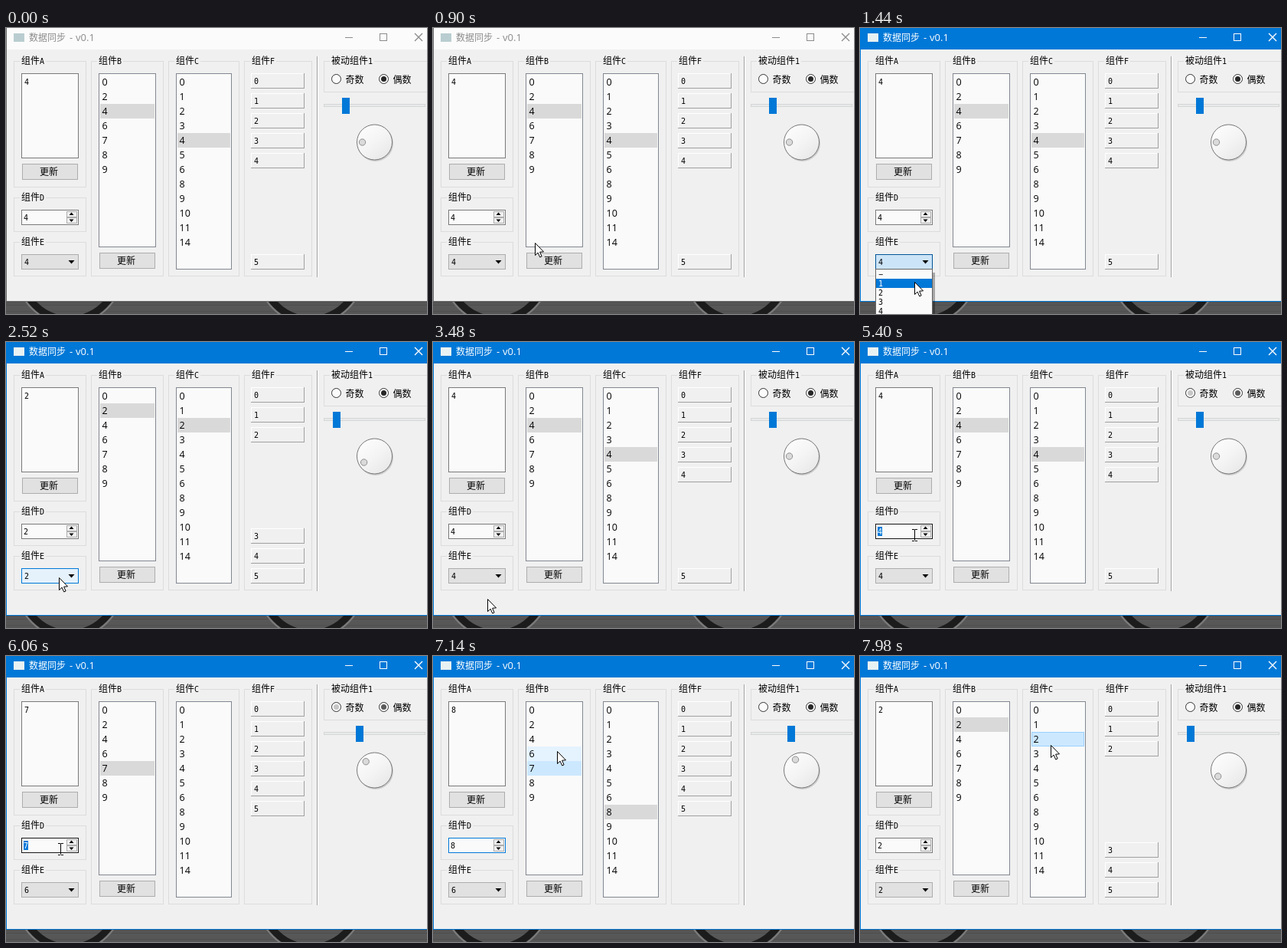
Animation of 550x373 px, one loop 8 s. Source, as an HTML page with a canvas:

```html
<!DOCTYPE html>
<html lang="zh">
<head>
<meta charset="utf-8">
<style>
html, body { margin: 0; width: 100%; height: 100%; overflow: hidden; background: #f0f0f0; }
canvas { display: block; width: 100vw; height: 100vh; }
</style>
</head>
<body>
<canvas id="stage" width="550" height="373"></canvas>
<script>
const g = document.getElementById('stage').getContext('2d');
const LOOP = 8000, STEP = 60, FADE = 240;
const BLUE = '#0078d7';
const CJK = '12px "Noto Sans CJK SC", "Noto Sans CJK", sans-serif';
const MONO = '10px "DejaVu Sans Mono", monospace';
const LIST = '12.5px "Open Sans", "Noto Sans", sans-serif';
const B_ITEMS = [0, 2, 4, 6, 7, 8, 9];
const C_ITEMS = [0, 1, 2, 3, 4, 5, 6, 8, 9, 10, 11, 14];

// [time, value]
const VALUES = [[0, 4], [1980, 2], [3360, 4], [4320, 3], [4440, 2], [4680, 1], [4740, 0],
  [5220, 1], [5280, 2], [5340, 3], [5400, 4], [5460, 5], [5520, 6], [6000, 7], [6300, 8], [7860, 2]];
// [time, x, y]
const PATH = [[300, 533, 135], [1080, 70, 303], [1200, 70, 303], [1440, 71, 331], [1800, 71, 342],
  [1980, 71, 342], [2520, 69, 307], [2880, 69, 307], [3240, 72, 366], [3360, 72, 366],
  [3600, 70, 303], [3660, 70, 303], [3900, 71, 251], [6360, 71, 251], [6720, 165, 146],
  [6840, 165, 146], [7140, 162, 124], [7560, 198, 88], [7860, 249, 116], [8000, 249, 116]];

const within = (t, a, b) => t >= a && t < b;
const inside = (p, x, y, w, h) => p && p.x >= x && p.x < x + w && p.y >= y && p.y < y + h;

function valueAt(t) {
  let v = 4;
  for (const [time, n] of VALUES) if (time <= t) v = n;
  return v;
}

// 1 = even is marked, 0 = odd
function evenLevel(t) {
  let level = 1;
  VALUES.forEach(([time, n], i) => {
    if (time > t) return;
    const end = Math.min(t, i + 1 < VALUES.length ? VALUES[i + 1][0] : LOOP);
    const move = (end - time) / FADE;
    level = n % 2 ? Math.max(0, level - move) : Math.min(1, level + move);
  });
  return level;
}

function pointerAt(t) {
  if (t < PATH[0][0]) return null;
  const i = PATH.findIndex(k => k[0] > t);
  const [t0, x0, y0] = PATH[i - 1], [t1, x1, y1] = PATH[i];
  let u = (t - t0) / (t1 - t0);
  u = u * u * (3 - 2 * u);
  return { x: Math.round(x0 + (x1 - x0) * u), y: Math.round(y0 + (y1 - y0) * u) };
}

function rect(x, y, w, h, fill) {
  g.fillStyle = fill;
  g.fillRect(x, y, w, h);
}

function box(x, y, w, h, fill, edge) {
  rect(x, y, w, h, edge);
  rect(x + 1, y + 1, w - 2, h - 2, fill);
}

function text(s, x, y, font = MONO, color = '#000') {
  g.font = font;
  g.fillStyle = color;
  g.fillText(s, x, y);
}

function poly(points, fill, edge) {
  g.beginPath();
  points.forEach(([x, y]) => g.lineTo(x, y));
  g.closePath();
  g.fillStyle = fill;
  g.fill();
  if (edge) {
    g.strokeStyle = edge;
    g.lineWidth = 1;
    g.stroke();
  }
}

function disc(x, y, r, fill, edge) {
  g.beginPath();
  g.arc(x, y, r, 0, 7);
  g.fillStyle = fill;
  g.fill();
  if (edge) {
    g.strokeStyle = edge;
    g.lineWidth = 1;
    g.stroke();
  }
}

function arrow(x, y, r, dir) {
  poly([[x - r, y - dir * r / 2], [x + r, y - dir * r / 2], [x, y + dir * r / 2 + dir * 0.5]], '#000');
}

function group(x, y, w, h, name, letter) {
  box(x, y, w, h, '#f0f0f0', '#dcdcdc');
  const width = name.length * 12 + 6;
  rect(x + 8, y - 2, width + 4, 5, '#f0f0f0');
  text(name, x + 10, y + 4, CJK);
  text(letter, x + 10 + name.length * 12, y + 4);
}

function button(x, y) {
  box(x, y, 73, 21, '#e1e1e1', '#adadad');
  text('更新', x + 23, y + 15, CJK);
}

function list(x, w, h, items, selected, focused, p) {
  box(x, 59, w, h, '#fafafa', '#828790');
  items.forEach((n, i) => {
    const y = 61 + i * 19;
    const hover = inside(p, x + 2, y, w - 4, 19);
    if (n === selected) {
      const fill = focused ? '#cce8ff' : '#d9d9d9';
      box(x + 2, y, w - 4, 19, fill, focused && hover ? '#99d1ff' : fill);
    } else if (hover) {
      rect(x + 2, y, w - 4, 19, '#e5f3ff');
    }
    text(n, x + 4.5, y + 14, LIST);
  });
}

function ring(x, y, r, width, color) {
  g.beginPath();
  g.arc(x, y, r, 0, 7);
  g.strokeStyle = color;
  g.lineWidth = width;
  g.stroke();
}

function desktop() {
  rect(0, 356, 550, 17, '#585858');
  for (let y = 357; y < 373; y += 2) {
    const s = Math.sin(y * 12.9898) * 43758.5453;
    rect(0, y, 550, 1, `rgba(0,0,0,${(s - Math.floor(s)) * 0.15})`);
  }
  for (const x of [83, 398]) {
    ring(x, 316, 64, 9, '#1c1c1c');
    ring(x, 316, 70, 2, '#7c7c7c');
  }
}

function frame(active) {
  const ink = active ? '#fff' : '#8c8c8c';
  rect(0, 0, 550, 357, active ? BLUE : '#6b6b6b');
  rect(1, 0, 549, 28, active ? BLUE : '#fbfbfb');
  rect(1, 28, 549, 328, '#f0f0f0');
  rect(10, 7, 14, 11, active ? '#e9f2f3' : '#b9cdd0');
  text('数据同步', 30, 17, CJK, ink);
  const font = '13px "Open Sans", "Noto Sans", sans-serif';
  text('-', 83, 17, font, ink);
  text('v0.1', 91, 17, font, ink);
  rect(443, 12, 10, 1, ink);
  g.strokeStyle = ink;
  g.lineWidth = 1;
  g.strokeRect(488.5, 7.5, 9, 9);
  g.lineWidth = 1.4;
  g.beginPath();
  g.moveTo(534, 7); g.lineTo(544, 17);
  g.moveTo(544, 7); g.lineTo(534, 17);
  g.stroke();
}

function spin(t, v, p) {
  const hover = inside(p, 20, 237, 75, 21);
  const edge = hover ? '#171717' : within(t, 3840, 7200) ? BLUE : '#7a7a7a';
  box(20, 237, 75, 20, '#fafafa', edge);
  const marked = within(t, 4320, 6840);
  if (marked) rect(23, 241, 6, 12, BLUE);
  text(v, 23, 251, MONO, marked ? '#fff' : '#000');
  box(79, 239, 14, 8, '#f0f0f0', '#adadad');
  box(79, 247, 14, 8, '#f0f0f0', '#adadad');
  arrow(85.5, 242.5, 3, -1);
  arrow(85.5, 251, 3, 1);
}

function combo(open, v, p) {
  const hover = inside(p, 20, 295, 75, 20);
  const [fill, edge] = open ? ['#cce4f7', '#005499'] : hover ? ['#e5f1fb', BLUE] : ['#e1e1e1', '#adadad'];
  box(20, 295, 75, 20, fill, edge);
  text(v ? Math.min(v, 6) : '-', 24, 309);
  arrow(85.5, 305, 4, 1);
}

function popup(p, v) {
  rect(95, 319, 3, 54, 'rgba(0,0,0,.3)');
  box(20, 314, 75, 80, '#fafafa', '#646464');
  ['−', 1, 2, 3, 4].forEach((n, i) => {
    const y = 315 + i * 12;
    const on = p.y >= 315 ? inside(p, 20, y, 75, 12) : n === v;
    if (on) rect(21, y, 73, 12, BLUE);
    text(n, 24, y + 10, MONO, on ? '#fff' : '#000');
  });
}

function labels(v) {
  for (let n = 0; n <= 5; n++) {
    const y = (n <= v ? 59 : 165) + n * 26;
    rect(320, y, 70, 20, '#a0a0a0');
    rect(320, y, 69, 19, '#fff');
    rect(321, y + 1, 68, 18, '#f0f0f0');
    text(n, 324, y + 14);
  }
}

function radio(x, name, level) {
  disc(x, 66.5, 6, '#fbfbfb', '#333');
  g.globalAlpha = level;
  disc(x, 66.5, 3.5, '#262626');
  g.globalAlpha = 1;
  text(name, x + 12, 71.5, CJK);
}

function slider(v) {
  box(415, 99, 133, 4, '#e7eaea', '#d6d6d6');
  rect(415 + 6 * v, 91, 10, 21, BLUE);
}

function dial(v) {
  const x = 481.5, y = 149;
  disc(x + 1, y + 1.5, 23.5, 'rgba(0,0,0,.15)');
  const shade = g.createLinearGradient(x - 16, y - 18, x + 16, y + 20);
  shade.addColorStop(0, '#fcfcfc');
  shade.addColorStop(0.5, '#f4f4f4');
  shade.addColorStop(1, '#e8e8e8');
  disc(x, y, 23, shade, '#777');
  const a = (240 - 15 * v) * Math.PI / 180;
  disc(x + 16 * Math.cos(a), y - 16 * Math.sin(a), 4.2, '#dadada', '#8e8e8e');
}

function pointer(p) {
  g.save();
  g.translate(p.x + 0.5, p.y + 0.5);
  if (inside(p, 20, 237, 59, 21)) {
    rect(-0.5, -7, 1, 14, '#000');
    for (const y of [-7.5, 7.5]) {
      rect(-3.5, y, 3, 1, '#000');
      rect(0.5, y, 3, 1, '#000');
    }
  } else {
    poly([[0, 0], [0, 16], [3.6, 12.6], [6.2, 18.4], [8.6, 17.4], [6.1, 11.7], [11, 11.3]], '#fff', '#000');
  }
  g.restore();
}

function draw(t) {
  const v = valueAt(t), p = pointerAt(t), even = evenLevel(t);
  const open = within(t, 1140, 1980) || within(t, 2820, 3360);
  const over = open ? null : p;
  const picked = within(t, 6840, 7860);

  desktop();
  frame(t >= 1140);

  group(10, 43, 95, 165, '组件', 'A');
  box(20, 59, 75, 111, '#fafafa', '#7a7a7a');
  text(v, 24, 74);
  button(21, 177);

  group(10, 221, 95, 45, '组件', 'D');
  spin(t, v, over);

  group(10, 279, 95, 45, '组件', 'E');
  combo(open, v, over);

  group(111, 43, 95, 281, '组件', 'B');
  list(121, 75, 227, B_ITEMS, picked ? 7 : v, picked, over);
  button(122, 293);

  group(212, 43, 93, 281, '组件', 'C');
  list(222, 73, 256, C_ITEMS, v, t >= 7860, over);

  group(311, 43, 89, 281, '组件', 'F');
  labels(v);

  rect(406, 37, 1, 288, '#a0a0a0');
  rect(407, 37, 1, 288, '#fff');

  group(415, 43, 140, 41, '被动组件', '1');
  radio(431.5, '奇数', 1 - even);
  radio(493.5, '偶数', even);
  slider(v);
  dial(v);

  if (open) popup(p, v);
  if (p) pointer(p);
}

function tick() {
  const t = performance.now() % LOOP;
  draw(Math.floor(t / STEP) * STEP);
  requestAnimationFrame(tick);
}
tick();
</script>
</body>
</html>
```
